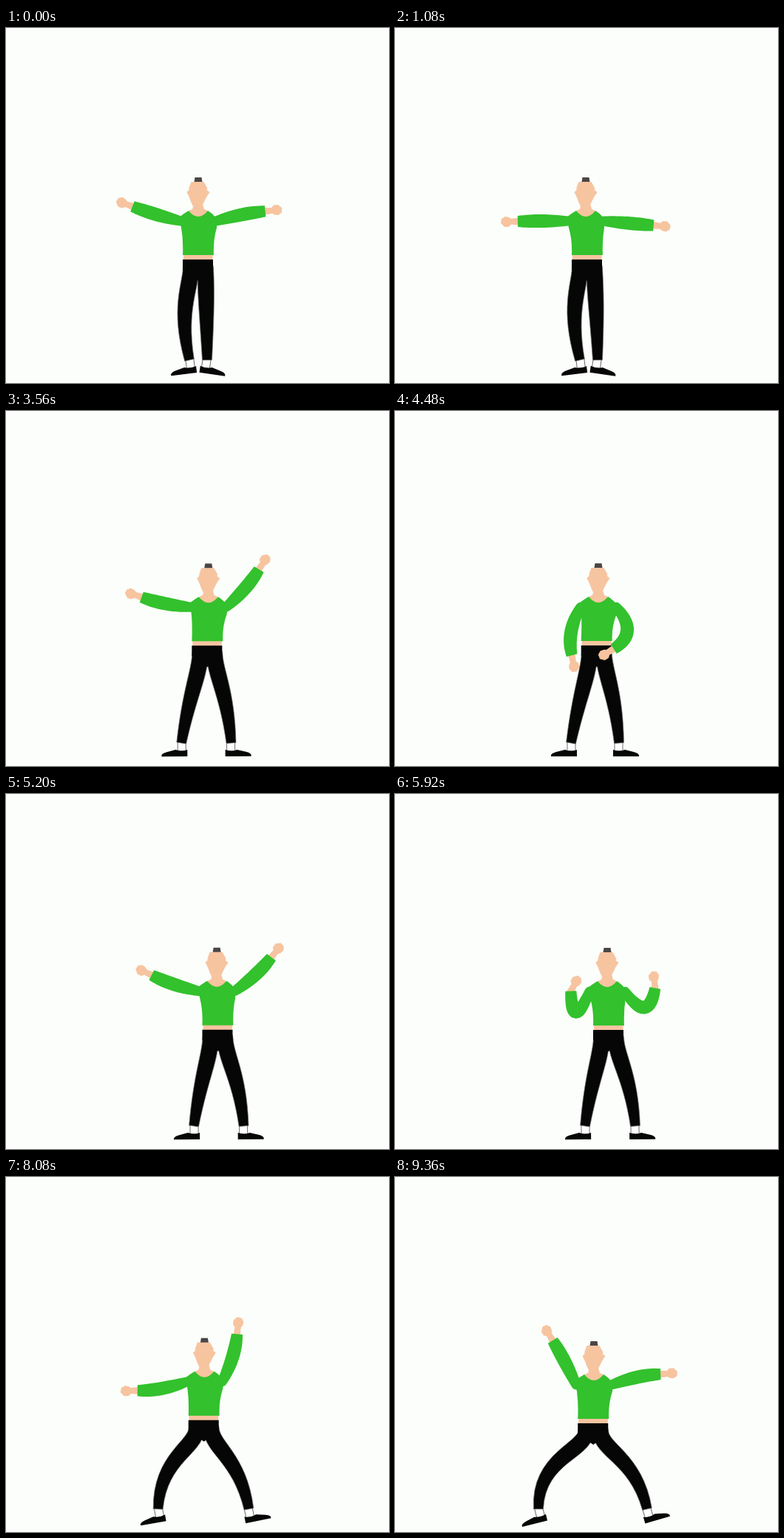
Recreate the animation shown at these times as an HTML page. Size 518 px wide and 480 px high, loop 9460 ms.

```html
<!DOCTYPE html>
<html lang="en">
<head>
<meta charset="utf-8">
<title>Dancer</title>
<style>
html, body { margin: 0; width: 100%; height: 100%; overflow: hidden; background: #fbfefa; }
svg { display: block; width: 518px; height: 480px; }
</style>
</head>
<body>
<svg id="stage" viewBox="0 0 518 480" xmlns="http://www.w3.org/2000/svg"></svg>
<script>
const LOOP = 9460, TICK = 40, FPS = 18, LAST = 168;
const UPPER = 36, FORE = 32, FLOOR = 449;
const GREEN = '#33c12d', SKIN = '#f7c4a0', BLACK = '#050605', HAIR = '#4b4646';

// arms: angles of upper arm and forearm, left then right
const POSES = [
  { at: 0, neck: [260, 250], feet: [248, 272], arms: [195, 199, -14, -8] },
  { at: 19, neck: [258, 250], feet: [250, 274], arms: [180, 179, 5, 5] },
  { at: 46, neck: [264, 256], feet: [231, 317], arms: [180, 307, -46, -36] },
  { at: 80, neck: [275, 254], feet: [238, 303], arms: [112, 87, 62, 129] },
  { at: 106, neck: [287, 256], feet: [257, 325], arms: [121, 258, 42, -64] },
  { at: 128, neck: [267, 256], feet: [233, 299], arms: [170, 282, 11, -97] },
  { at: LAST, neck: [269, 270], feet: [194, 341], arms: [244, 240, -17, -7] }
];
// arms pass through this spread on the way to the next pose
const OPEN = [195, 203, -38, -48];

const FIST = 'M-4-5L9-4L12-7L18-7L23-2L22 4L17 7L12 6L9 4L-4 5Z';
const SOCK = 'M-6-3V11H5V-3Z';
const SHOE = 'M-8 9V18H27Q28 14 20 12L8 9Q0 12-8 9Z';
const FACE = 'M-9-17H8L13-8L12-6L16-3L12 3L8 11L5 17H-6L-9 11L-12 3L-15-3L-12-6L-12-9Z';
const TUFT = 'M-5-17L-4-23H5L6-17Z';
const NECK = 'M-6-12H6L8-5Q12-4 13-2Q8 8 0 8Q-8 8-13-2Q-12-4-8-5Z';

const stage = document.getElementById('stage');

function add(fill, d = '', stroke = 'none') {
  const p = document.createElementNS(stage.namespaceURI, 'path');
  p.setAttribute('fill', fill);
  p.setAttribute('stroke', stroke);
  p.setAttribute('stroke-width', 0.7);
  p.setAttribute('d', d);
  stage.appendChild(p);
  return p;
}

const pair = make => [make(), make()];
const socks = pair(() => add('#fff', SOCK, '#333'));
const shoes = pair(() => add(BLACK, SHOE));
const belly = add(SKIN);
const legs = pair(() => add(BLACK, '', '#777'));
const pelvis = add(BLACK);
const neck = add(SKIN, NECK);
const torso = add(GREEN);
const head = [add(SKIN, FACE), add(HAIR, TUFT)];
const fists = pair(() => add(SKIN, FIST));
const sleeves = pair(() => add(GREEN));

const put = (el, value) => el.setAttribute('transform', value);
const draw = (el, d) => el.setAttribute('d', d);
const mix = (a, b, k) => a + (b - a) * k;
const mixAll = (a, b, k) => a.map((v, i) => mix(v, b[i], k));
const clamp = k => Math.max(0, Math.min(1, k));
const ease = k => k * k * (3 - 2 * k);
const polar = ([x, y], deg, len) => {
  const a = deg * Math.PI / 180;
  return [x + Math.cos(a) * len, y + Math.sin(a) * len];
};

function poseAt(step) {
  const i = Math.max(1, POSES.findIndex(p => p.at >= step));
  const a = POSES[i - 1], b = POSES[i], gap = b.at - a.at;
  const k = (step - a.at) / gap;
  const lead = ease(clamp(k * 1.5));
  // longer gaps leave room for a full swing, one arm up while the other drops
  const sway = clamp((gap - 15) / 8), beats = Math.round(gap / 26);
  const open = sway * Math.sin(Math.PI * k) ** 2;
  const wave = sway * 38 * Math.sin(2 * Math.PI * k * beats);
  return {
    neck: mixAll(a.neck, b.neck, lead),
    feet: mixAll(a.feet, b.feet, lead),
    arms: mixAll(mixAll(a.arms, b.arms, ease(k)), OPEN, open).map(v => v + wave)
  };
}

// tapered tube around a cubic curve, widths at start, middle and end
function limb(p0, p1, p2, p3, w0, w1, w2) {
  const near = [], far = [], count = 16;
  const show = (x, y) => x.toFixed(2) + ' ' + y.toFixed(2);
  for (let i = 0; i <= count; i++) {
    const t = i / count;
    const ab = mixAll(p0, p1, t), bc = mixAll(p1, p2, t), cd = mixAll(p2, p3, t);
    const from = mixAll(ab, bc, t), to = mixAll(bc, cd, t);
    const [x, y] = mixAll(from, to, t);
    const dx = to[0] - from[0], dy = to[1] - from[1], len = Math.hypot(dx, dy) || 1;
    const r = (mix(w0, w2, t) + 4 * t * (1 - t) * (w1 - (w0 + w2) / 2)) / 2;
    const ox = -dy / len * r, oy = dx / len * r;
    near.push(show(x + ox, y + oy));
    far.unshift(show(x - ox, y - oy));
  }
  return `M${near.concat(far).join('L')}A${w0 / 2} ${w0 / 2} 0 0 0 ${near[0]}Z`;
}

function drawArm(i, shoulder, upper, fore) {
  const elbow = polar(shoulder, upper, UPPER);
  const cuff = polar(elbow, fore, FORE);
  const bend = mixAll(elbow, mixAll(shoulder, cuff, 0.5), -0.8);
  draw(sleeves[i], limb(shoulder, mixAll(shoulder, bend, 2 / 3),
    mixAll(cuff, bend, 2 / 3), cuff, 13, 18, 15));
  put(fists[i], `translate(${cuff}) rotate(${fore + (fore - upper) * 0.3})`);
}

function drawLeg(i, hip, x, spread) {
  const side = i ? 1 : -1, extra = spread - 65;
  // the left knee bows in a very narrow or very wide stance
  const knee = i ? mix(hip[0], x, 0.75) : mix(hip[0], x, 0.5) - Math.abs(extra) * 0.4;
  const tilt = i ? -extra * 0.2 : Math.abs(extra) * 0.17;
  draw(legs[i], limb(hip, [hip[0], hip[1] + 26], [knee, FLOOR - 70], [x, FLOOR], 21, 21, 13));
  for (const el of [socks[i], shoes[i]]) {
    put(el, `translate(${x} ${FLOOR}) scale(${side} 1) rotate(${tilt})`);
  }
}

function render(step) {
  const { neck: [nx, ny], feet, arms } = poseAt(step);
  const wx = mix(nx, (feet[0] + feet[1]) / 2, 0.5), wy = ny + 57;
  const N = (x, y) => `${nx + x} ${ny + y} `;
  const W = (x, y) => `${wx + x} ${wy + y} `;

  put(neck, `translate(${nx} ${ny})`);
  for (const el of head) put(el, `translate(${nx - 0.5} ${ny - 25})`);
  draw(torso, 'M' + N(-13, -3) + 'Q' + N(-20, 1) + N(-26, 6) + 'L' + N(-23, 20) +
    'Q' + W(-20, -20) + W(-21, 0) + 'L' + W(21, 0) + 'Q' + W(20, -20) + N(25, 20) +
    'L' + N(25, 8) + 'Q' + N(20, 1) + N(13, -3) + 'Q' + N(0, 13) + N(-13, -3) + 'Z');
  draw(belly, 'M' + W(-20, -3) + 'L' + W(20, -3) + W(19, 9) + W(-20, 9) + 'Z');
  draw(pelvis, 'M' + W(-21, 6) + 'L' + W(20, 6) + W(20, 20) + W(0, 35) + W(-21, 20) + 'Z');

  const spread = feet[1] - feet[0];
  [-1, 1].forEach((side, i) => {
    drawArm(i, [nx + side * 24, ny + 11], arms[2 * i], arms[2 * i + 1]);
    drawLeg(i, [wx + side * 10, wy + 17], feet[i], spread);
  });
}

function play(now) {
  const tick = Math.floor(now % LOOP / TICK) * TICK;
  render(Math.min(LAST, Math.floor(tick * FPS / 1000)));
  requestAnimationFrame(play);
}
render(0);
requestAnimationFrame(play);
</script>
</body>
</html>
```
